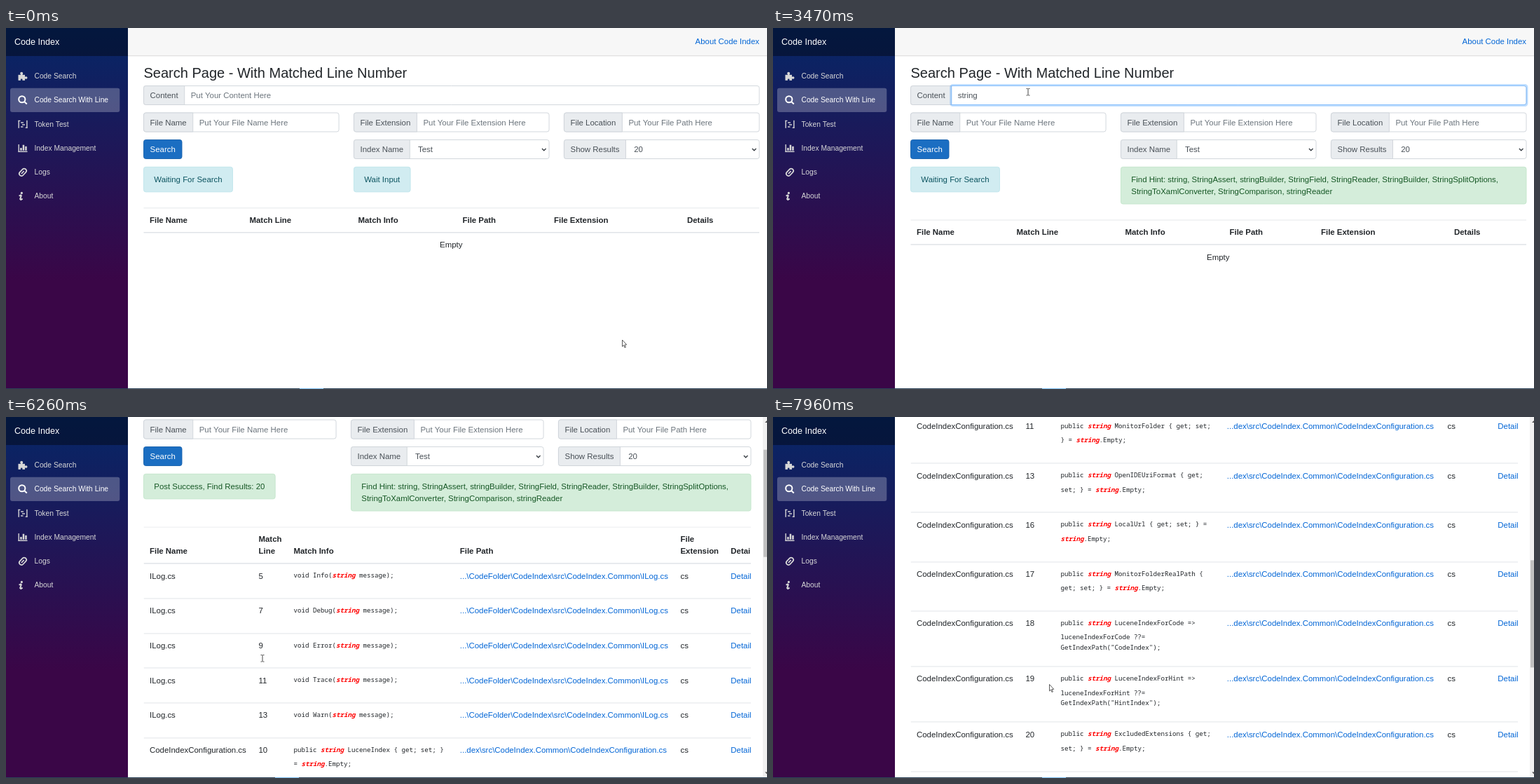
Animation, 1086 px wide and 515 px high, one loop 8 s. Source, as an HTML page with a canvas:

```html
<!DOCTYPE html>
<html lang="en">
<head>
<meta charset="utf-8">
<title>Code Index</title>
<style>
  html, body { margin: 0; width: 100%; height: 100%; overflow: hidden; background: #fff; }
  canvas { display: block; width: 1086px; height: 515px; }
</style>
</head>
<body>
<canvas id="stage"></canvas>
<script>
const W = 1086, H = 515, LOOP = 8000;
const canvas = document.getElementById('stage');
const dpr = window.devicePixelRatio || 1;
canvas.width = W * dpr;
canvas.height = H * dpr;
const ctx = canvas.getContext('2d');

const SANS = '"Liberation Sans", Arial, sans-serif';
const BODY = `11.43px ${SANS}`, BOLD = `bold ${BODY}`;
const MONO = '9.17px "Noto Sans Mono", monospace', CHAR = 5.5;
const INK = '#212529', LINK = '#0366d6', LINE = '#dee2e6', EDGE = '#ced4da';
const LEFT = 196.5, SIDE = 174, LEADING = 17.15;
const INFO = { bg: '#d1ecf1', edge: '#bee5eb', ink: '#0c5460' };
const OK = { bg: '#d4edda', edge: '#c3e6cb', ink: '#155724' };

// Timeline
const FOCUS = 600, HINT_1 = 1910, HINT_2 = 2540, RESULTS = 3780;
const WORD = 'string', KEYS = [1380, 1680, 1760, 2310, 2460, 2920], BLINK = 543;
const BURSTS = [[70, 76.6, 10], [4940, 78, 7], [5560, 77.5, 5], [6100, 80, 4], [6720, 80, 5], [7420, 77, 8]];
const TICKS = [6080, 6700, 7422, 7600, 7779], TICK_PX = 133, TICK_MS = 230;
const MOVES = [
  { from: 0, to: 600, path: [[879, 445], [640, 280], [364, 91]] },
  { from: 4900, to: 5400, path: [[364, 91], [433, 250], [370, 366]] },
  { from: 5520, to: 5865, path: [[370, 366], [369, 356], [366, 344]] },
  { from: 6760, to: 7040, path: [[366, 344], [362.5, 348], [394, 381.5]] }
];

const HINTS = {
  wide: [
    'Find Hint: string, StringAssert, stringBuilder, StreamReader, StringField, StringReader, stream1,',
    'StringBuilder, StringSplitOptions, streamReader, StringToXamlConverter, StringComparison, stream,',
    'stream2, stringReader'
  ],
  narrow: [
    'Find Hint: string, StringAssert, stringBuilder, StringField, StringReader, StringBuilder, StringSplitOptions,',
    'StringToXamlConverter, StringComparison, stringReader'
  ]
};

const LOG = ['ILog.cs', '...\\CodeFolder\\CodeIndex\\src\\CodeIndex.Common\\ILog.cs'];
const CONFIG = ['CodeIndexConfiguration.cs', '...dex\\src\\CodeIndex.Common\\CodeIndexConfiguration.cs'];
const ROWS = [
  ...['Info', 'Debug', 'Error', 'Trace', 'Warn'].map((name, i) =>
    [LOG, 5 + 2 * i, `void ${name}(string message);`]),
  [CONFIG, 10, 'public string LuceneIndex { get; set; }', '= string.Empty;'],
  [CONFIG, 11, 'public string MonitorFolder { get; set;', '} = string.Empty;'],
  [CONFIG, 13, 'public string OpenIDEUriFormat { get;', 'set; } = string.Empty;'],
  [CONFIG, 16, 'public string LocalUrl { get; set; } =', 'string.Empty;'],
  [CONFIG, 17, 'public string MonitorFolderRealPath {', 'get; set; } = string.Empty;'],
  [CONFIG, 18, 'public string LuceneIndexForCode =>', 'luceneIndexForCode ??=', 'GetIndexPath("CodeIndex");'],
  [CONFIG, 19, 'public string LuceneIndexForHint =>', 'luceneIndexForHint ??=', 'GetIndexPath("HintIndex");'],
  [CONFIG, 20, 'public string ExcludedExtensions { get;', 'set; } = string.Empty;']
];
const ROW_HEIGHT = [49.7, 70.2, 79.3], CODE_Y = [20, 40.5, 55.3];

const clamp = v => Math.min(1, Math.max(0, v));
const smooth = v => { const u = clamp(v); return u * u * (3 - 2 * u); };

function stepped(t) {
  let q = 0;
  for (const [start, step, count] of BURSTS)
    if (t >= start) q = start + step * Math.min(count - 1, Math.floor((t - start) / step));
  return q;
}

const scrollAt = t => Math.round(TICK_PX * TICKS.reduce((sum, s) => sum + smooth((t - s) / TICK_MS), 0));

function pointerAt(t) {
  const move = MOVES.filter(m => t >= m.from).pop();
  const u = smooth((t - move.from) / (move.to - move.from)), v = 1 - u;
  const [a, b, c] = move.path;
  return [0, 1].map(i => v * v * a[i] + 2 * u * v * b[i] + u * u * c[i]);
}

// Drawing helpers
function text(s, x, y, color = INK, font = BODY, align = 'left') {
  ctx.font = font;
  ctx.fillStyle = color;
  ctx.textAlign = align;
  ctx.fillText(s, x, y);
}
function rect(x, y, w, h, color) {
  ctx.fillStyle = color;
  ctx.fillRect(x, y, w, h);
}
function box(x, y, w, h, fill, edge, radii = 3) {
  ctx.beginPath();
  ctx.roundRect(x, y, w, h, radii);
  if (fill) { ctx.fillStyle = fill; ctx.fill(); }
  if (edge) { ctx.strokeStyle = edge; ctx.lineWidth = 0.9; ctx.stroke(); }
}
function poly(points, close) {
  ctx.beginPath();
  points.forEach(([x, y]) => ctx.lineTo(x, y));
  if (close) ctx.closePath();
}
function widthOf(s) {
  ctx.font = BODY;
  return ctx.measureText(s).width;
}

// Labelled field; returns the x of its inner text.
function field(x, y, w, label, hint) {
  const lw = widthOf(label) + 18.2;
  box(x, y, w, 27, '#fff', EDGE);
  box(x, y, lw, 27, '#e9ecef', EDGE, [3, 0, 0, 3]);
  text(label, x + 9.1, y + 17.8, '#495057');
  if (hint) text(hint, x + lw + 9, y + 17.8, '#6c757d');
  return x + lw + 9;
}
function select(x, y, w, label, value) {
  text(value, field(x, y, w, label) + 2.8, y + 17.8, '#495057');
  const cx = x + w - 7.3, cy = y + 14;
  poly([[cx - 2.8, cy - 1.5], [cx, cy + 1.3], [cx + 2.8, cy - 1.5]]);
  ctx.strokeStyle = '#343a40';
  ctx.lineWidth = 1.3;
  ctx.stroke();
}
function notice(x, y, lines, look, w) {
  const h = 18.4 + LEADING * lines.length;
  box(x, y, w || widthOf(lines[0]) + 29.6, h, look.bg, look.edge);
  lines.forEach((s, i) => text(s, x + 14.8, y + 21.7 + LEADING * i, look.ink));
  return y + h;
}
function codeLine(s, x, y) {
  let at = 0;
  for (const part of s.split(/\b(string)\b/)) {
    const hit = part === WORD;
    text(part, x + at * CHAR, y, hit ? '#f00' : INK, hit ? `italic bold ${MONO}` : MONO);
    at += part.length;
  }
}

function contentField(t, q, right) {
  const y = 82.5, x = field(LEFT, y, right - LEFT, 'Content');
  const typed = KEYS.filter(k => t >= k).length;
  if (t >= FOCUS) {
    const x0 = x - 9;
    ctx.globalAlpha = clamp((q - 570) / 150);
    ctx.beginPath();
    ctx.roundRect(x0 - 1.2, y - 1.2, right - x0 + 2.4, 29.4, 3);
    ctx.strokeStyle = 'rgba(0,123,255,.25)';
    ctx.lineWidth = 2.4;
    ctx.stroke();
    box(x0, y, right - x0, 27, null, '#80bdff', [0, 3, 3, 0]);
    ctx.globalAlpha = 1;
  }
  const value = WORD.slice(0, typed);
  if (typed) text(value, x, y + 17.8, '#495057');
  else text('Put Your Content Here', x, y + 17.8, '#6c757d');
  const last = typed ? KEYS[typed - 1] : FOCUS;
  if (t >= FOCUS && Math.floor((t - last) / BLINK) % 2 === 0)
    rect(Math.round(x + widthOf(value) - 0.5), 89, 1, 13, '#495057');
}

function emptyTable(top, right) {
  rect(LEFT, top, right - LEFT, 0.8, LINE);
  const heads = [['File Name', 205], ['Match Line', 347.5], ['Match Info', 502.5],
    ['File Path', 651.5], ['File Extension', 782], ['Details', 972]];
  heads.forEach(([s, x]) => text(s, x, top + 21.3, INK, BOLD));
  rect(LEFT, top + 34.6, right - LEFT, 1.4, LINE);
  text('Empty', 635.3, top + 57, INK, BODY, 'center');
}

function resultTable(top, right) {
  ctx.save();
  ctx.beginPath();
  ctx.rect(LEFT, top, right - LEFT, 2000);
  ctx.clip();
  rect(LEFT, top, right - LEFT, 0.8, LINE);
  const heads = [['File Name', 205], ['Match|Line', 360.5], ['Match Info', 410.5],
    ['File Path', 647.8], ['File|Extension', 962.5], ['Details', 1034.3]];
  for (const [s, x] of heads)
    s.split('|').reverse().forEach((part, i) => text(part, x, top + 38.7 - LEADING * i, INK, BOLD));
  rect(LEFT, top + 51.6, right - LEFT, 1.4, LINE);
  let y = top + 52.6;
  ROWS.forEach(([[name, path], line, ...code], i) => {
    if (i) rect(LEFT, Math.round(y) - 0.5, right - LEFT, 0.9, LINE);
    const base = y + 21.4;
    text(name, 205, base);
    text(line, 360.5, base);
    code.forEach((s, n) => codeLine(s, 410.5, y + CODE_Y[n]));
    text(path, 647.8, base, LINK);
    text('cs', 962.5, base);
    text('Detail', 1034.3, base, LINK);
    y += ROW_HEIGHT[code.length - 1];
  });
  rect(LEFT, Math.round(y) - 0.5, right - LEFT, 0.9, LINE);
  ctx.restore();
}

function page(t, q) {
  const found = t >= RESULTS, right = found ? 1063 : 1075;
  const pitch = (right - LEFT + 21.4) / 3, colW = pitch - 21.4;
  const col = i => LEFT + pitch * i;
  rect(SIDE, 0, W - SIDE, 39.5, '#f7f7f7');
  rect(SIDE, 39.3, W - SIDE, 0.9, '#d6d5d5');
  text('About Code Index', right, 23.4, LINK, BODY, 'right');
  text('Search Page - With Matched Line Number', LEFT, 71.2, INK, `20px ${SANS}`);

  contentField(t, q, right);
  field(col(0), 121, colW, 'File Name', 'Put Your File Name Here');
  field(col(1), 121, colW, 'File Extension', 'Put Your File Extension Here');
  field(col(2), 121, colW, 'File Location', 'Put Your File Path Here');
  box(LEFT, 159.5, 54.5, 27, '#1b6ec2', '#1861ac');
  text('Search', 205.6, 177.3, '#fff');
  select(col(1), 159.5, colW, 'Index Name', 'Test');
  select(col(2), 159.5, colW, 'Show Results', '20');

  if (found) notice(LEFT, 198.3, ['Post Success, Find Results: 20'], OK);
  else notice(LEFT, 198.3, ['Waiting For Search'], INFO);
  const bottom = t < HINT_1
    ? notice(col(1), 198.3, ['Wait Input'], INFO)
    : notice(col(1), 198.3, t < HINT_2 ? HINTS.wide : HINTS.narrow, OK, colW * 2 + 21.4);
  (found ? resultTable : emptyTable)(bottom + 22.6, right);
}

// Sidebar icons, each drawn around its own centre
const bars = list => list.forEach(([x, y, w, h]) => ctx.fillRect(x, y, w, h));
function dot(x, y, r) {
  ctx.beginPath();
  ctx.arc(x, y, r, 0, 7);
  ctx.fill();
}
const ICONS = {
  puzzle() {
    bars([[-6.5, -2, 9.5, 8], [-3, -4, 2.5, 3], [2, 1, 3, 2.4]]);
    dot(-1.8, -4, 2);
    dot(4.7, 2.2, 1.8);
    ctx.fillStyle = '#0b2462';
    dot(-1.8, 5.2, 1.4);
  },
  lens() {
    ctx.lineWidth = 2;
    ctx.beginPath();
    ctx.arc(-1.2, -1.3, 4.6, 0, 7);
    ctx.moveTo(2.3, 2.2);
    ctx.lineTo(5.8, 5.4);
    ctx.stroke();
  },
  token() {
    bars([[-6.5, -5.5, 1.4, 11], [5.2, -5.5, 1.4, 11], [-6.5, -5.5, 3, 1.2], [3.6, 4.3, 3, 1.2],
      [-3, -3, 4, 1.4], [-1, 0, 4, 1.4], [-3, 3, 3.5, 1.4]]);
  },
  chart() {
    bars([[-6.5, -5.5, 1.4, 11], [-6.5, 4.1, 13, 1.4], [-3.8, -0.5, 2.5, 3.7], [-0.3, -4.8, 2.5, 8], [3.2, -2.7, 2.5, 5.9]]);
  },
  clip() {
    ctx.rotate(0.75);
    ctx.lineWidth = 1.7;
    ctx.beginPath();
    ctx.roundRect(-3.2, -6, 6.4, 12, 3.2);
    ctx.moveTo(0, -2.5);
    ctx.lineTo(0, 3);
    ctx.stroke();
  },
  info() {
    dot(-1.6, -4.6, 1.6);
    ctx.lineWidth = 2;
    poly([[-5.4, -0.4], [-3, -1.6], [-2.2, -1], [-3.8, 4], [-2.8, 4.9], [-0.4, 3.6]]);
    ctx.stroke();
  }
};
const NAV = [['Code Search', 'puzzle'], ['Code Search With Line', 'lens'], ['Token Test', 'token'],
  ['Index Management', 'chart'], ['Logs', 'clip'], ['About', 'info']];

function sidebar() {
  const fade = ctx.createLinearGradient(0, 0, 0, H);
  fade.addColorStop(0, 'rgb(5,39,103)');
  fade.addColorStop(0.7, '#3a0647');
  rect(0, 0, SIDE, H, fade);
  rect(0, 0, SIDE, 40, 'rgba(0,0,0,.4)');
  text('Code Index', 12, 24.4, '#fff', `12.57px ${SANS}`);
  box(6, 85.8, 156.3, 34.2, 'rgba(255,255,255,.25)', null);
  NAV.forEach(([label, icon], i) => {
    const y = 68.6 + 34.25 * i, color = i === 1 ? '#fff' : '#d7d7d7';
    text(label, 40.5, y + 3.6, color, `10.28px ${SANS}`);
    ctx.save();
    ctx.translate(24, y + 0.2);
    ctx.fillStyle = ctx.strokeStyle = color;
    ICONS[icon]();
    ctx.restore();
  });
}

function scrollbar(scroll) {
  rect(1080, 0, 6, H, '#f1f1f1');
  rect(1081, 12 + scroll * 0.2964, 5, 153, '#c1c1c1');
  ctx.fillStyle = '#505050';
  for (const [y, d] of [[8, -3], [506.5, 3]]) {
    poly([[1083, y], [1089, y], [1086, y + d]], true);
    ctx.fill();
  }
}

function pointer(t, q) {
  const [x, y] = pointerAt(q);
  const beam = (y > 82 && y < 110) || (q > 5780 && q < 6870);
  ctx.save();
  ctx.translate(x, y);
  if (beam) {
    ctx.fillStyle = '#444';
    bars([[-0.5, -4.5, 1, 9.5], [-2.5, -5, 2, 0.9], [0.5, -5, 2, 0.9], [-2.5, 4.6, 2, 0.9], [0.5, 4.6, 2, 0.9]]);
  } else {
    poly([[0.5, 0], [0.5, 9.4], [2.5, 7.5], [4, 11], [5.4, 10.4], [3.9, 7], [6.7, 6.8]], true);
    ctx.fillStyle = '#fff';
    ctx.fill();
    ctx.strokeStyle = '#333';
    ctx.lineWidth = 0.8;
    ctx.stroke();
  }
  ctx.restore();
}

function draw(t) {
  const q = stepped(t), scroll = scrollAt(q);
  ctx.setTransform(dpr, 0, 0, dpr, 0, 0);
  rect(0, 0, W, H, '#fff');
  ctx.save();
  ctx.translate(0, -scroll);
  page(t, q);
  ctx.restore();
  sidebar();
  if (t >= RESULTS) scrollbar(scroll);
  rect(0, 514, W, 1, '#2b4257');
  rect(t < FOCUS ? 419 : 384, 514, 34, 1, '#76b9ed');
  pointer(t, q);
}

const begin = performance.now();
function loop() {
  draw((performance.now() - begin) % LOOP);
  requestAnimationFrame(loop);
}
loop();
</script>
</body>
</html>
```
